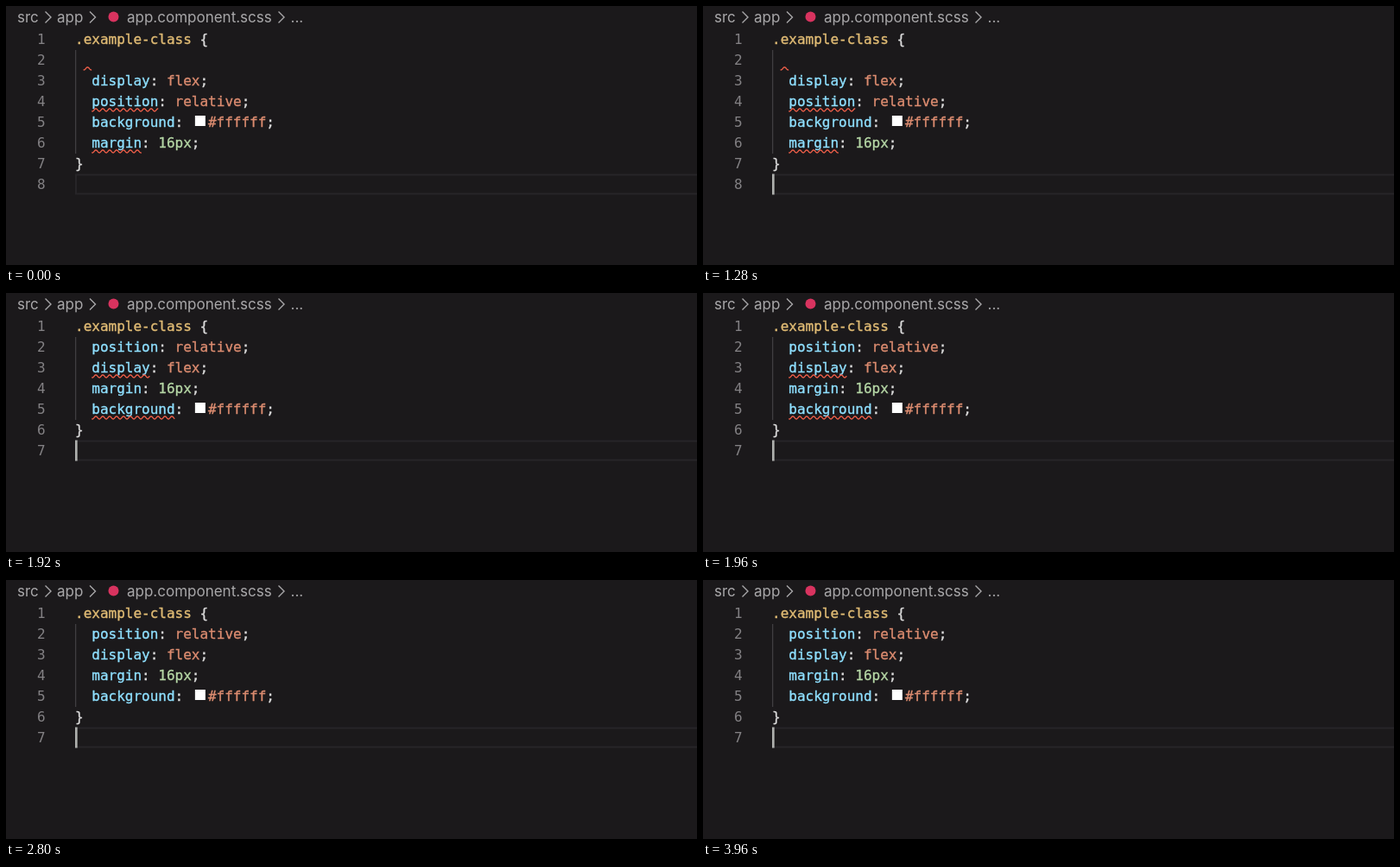
These frames come from a looping animation (800 by 300 pixels, 4000 ms). An HTML page:

```html
<!DOCTYPE html>
<html lang="en">
<head>
<meta charset="utf-8">
<title>Sorting style properties on save</title>
<style>
  html, body { margin: 0; width: 100%; height: 100%; overflow: hidden; background: #1b191b; }
  svg { display: block; }
  text { white-space: pre; }
  .code { font: 16px "DejaVu Sans Mono", monospace; fill: currentColor; stroke: currentColor; stroke-width: 0.35; }
  .crumb { font: 17px Inter, sans-serif; fill: #a8a7a9; }
  .chevron { fill: none; stroke: #a8a7a9; stroke-width: 1.4; }
  .num { color: #838184; stroke: none; }
  .sel { color: #e0bb74; }
  .prop { color: #8fe0ff; }
  .val { color: #dc8c70; }
  .unit { color: #b5d6a5; }
  .punct { color: #dcdcdc; }
  .guide { fill: #403e41; }
  .active { fill: none; stroke: #272528; stroke-width: 2; }
  .wave { fill: none; stroke: #f0604a; stroke-width: 1.3; }
  .cursor { fill: #aeafad; }
</style>
</head>
<body>
<svg id="stage" width="800" height="300" viewBox="0 0 800 300"></svg>
<script>
const LOOP = 4000, LEFT = 80, TOP = 27, ROW = 24, CHAR = 9.632;
const stage = document.getElementById('stage');

function add(parent, tag, attrs, text) {
  const el = document.createElementNS('http://www.w3.org/2000/svg', tag);
  for (const name in attrs) el.setAttribute(name, attrs[name]);
  if (text) el.textContent = text;
  return parent.appendChild(el);
}

const rowTop = line => TOP + (line - 1) * ROW;
const colX = col => LEFT + col * CHAR;

// Hard switches: each step is [time, properties].
function play(el, steps) {
  const frames = steps.map(([time, props]) =>
    ({ ...props, offset: time / LOOP, easing: 'steps(1, end)' }));
  frames.push({ ...steps[steps.length - 1][1], offset: 1 });
  el.animate(frames, { duration: LOOP, iterations: Infinity });
}

function showBetween(el, from, to) {
  const steps = [[0, { opacity: from > 0 ? 0 : 1 }]];
  if (from > 0) steps.push([from, { opacity: 1 }]);
  if (to < LOOP) steps.push([to, { opacity: 0 }]);
  play(el, steps);
}

function breadcrumb() {
  const label = (x, text) => add(stage, 'text', { x, y: 19, class: 'crumb' }, text);
  label(13, 'src');
  label(59, 'app');
  label(140, 'app.component.scss');
  label(329.5, '...');
  for (const x of [45.5, 97, 315.5])
    add(stage, 'path', { d: `M${x} 6.5l6.5 6.5l-6.5 6.5`, class: 'chevron' });
  add(stage, 'circle', { cx: 124.5, cy: 12.5, r: 6, fill: '#d8335f' });
}

function code(parent, line, col, runs) {
  let x = colX(col);
  for (const [cls, text] of runs) {
    add(parent, 'text', { x, y: rowTop(line) + 17, class: 'code ' + cls }, text);
    x += text.length * CHAR;
  }
}

const props = {
  display: ['val', 'flex'],
  position: ['val', 'relative'],
  background: ['val', '#ffffff'],
  margin: ['unit', '16px']
};

function property(parent, line, name) {
  const [cls, value] = props[name];
  code(parent, line, 2, [['prop', name], ['punct', ': ']]);
  let col = name.length + 4;
  if (value[0] === '#') {
    add(parent, 'rect', { x: colX(col) + 4, y: rowTop(line) + 4, width: 12, height: 12, fill: '#fff' });
    col += 19.1 / CHAR;
  }
  code(parent, line, col, [[cls, value], ['punct', ';']]);
}

// Underline of shallow arches, 8 px long, starting just before a trough.
function wave(parent, line, col, length) {
  const x0 = colX(col), width = length * CHAR, y = rowTop(line) + ROW - 2.6;
  let d = '';
  for (let x = 0; x <= width; x += 0.5)
    d += `${d ? 'L' : 'M'}${(x0 + x).toFixed(2)} ${(y + 1.6 * Math.cos((x - 0.8) * Math.PI / 4)).toFixed(2)}`;
  add(parent, 'path', { d, class: 'wave' });
}

// names: one entry per line inside the braces, '' for an empty line.
// marks: [line, column, length] of each underline.
function scene({ names, marks, from, to, marksTo }) {
  const g = add(stage, 'g', {});
  const last = names.length + 3;
  add(g, 'rect', { x: LEFT + 1, y: rowTop(last) + 0.5, width: 740, height: ROW - 2, class: 'active' });
  add(g, 'rect', { x: LEFT, y: rowTop(2), width: 1.3, height: names.length * ROW, class: 'guide' });
  for (let line = 1; line <= last; line++)
    add(g, 'text', { x: 36, y: rowTop(line) + 17, class: 'code num' }, String(line));
  code(g, 1, 0, [['sel', '.example-class'], ['punct', ' {']]);
  names.forEach((name, i) => name && property(g, i + 2, name));
  code(g, last - 1, 0, [['punct', '}']]);
  const waves = add(g, 'g', {});
  marks.forEach(mark => wave(waves, ...mark));
  showBetween(g, from, to);
  if (marksTo) showBetween(waves, 0, marksTo);
}

const SAVE = 1720, SORT = 1760, LINT = 2200;

breadcrumb();
scene({
  names: ['', 'display', 'position', 'background', 'margin'],
  marks: [[2, 1, 1], [4, 2, 8], [6, 2, 6]],
  from: 0, to: SAVE
});
scene({
  names: ['display', 'position', 'background', 'margin'],
  marks: [[2, 2, 7], [4, 2, 10], [6, 0, 1]],
  from: SAVE, to: SORT
});
scene({
  names: ['position', 'display', 'margin', 'background'],
  marks: [[3, 2, 7], [5, 2, 10]],
  from: SORT, to: LOOP, marksTo: LINT
});

// The caret blinks every 500 ms and restarts when the file is saved.
const caret = add(stage, 'rect', { x: LEFT, y: 0, width: 2.67, height: ROW, class: 'cursor' });
const blink = [0, 200, 700, 1200, 1700, SAVE, 2270, 2770, 3270, 3770];
play(caret, blink.map((time, i) => [time, {
  opacity: i % 2,
  transform: `translateY(${rowTop(time < SAVE ? 8 : 7) - 0.5}px)`
}]));
</script>
</body>
</html>
```
